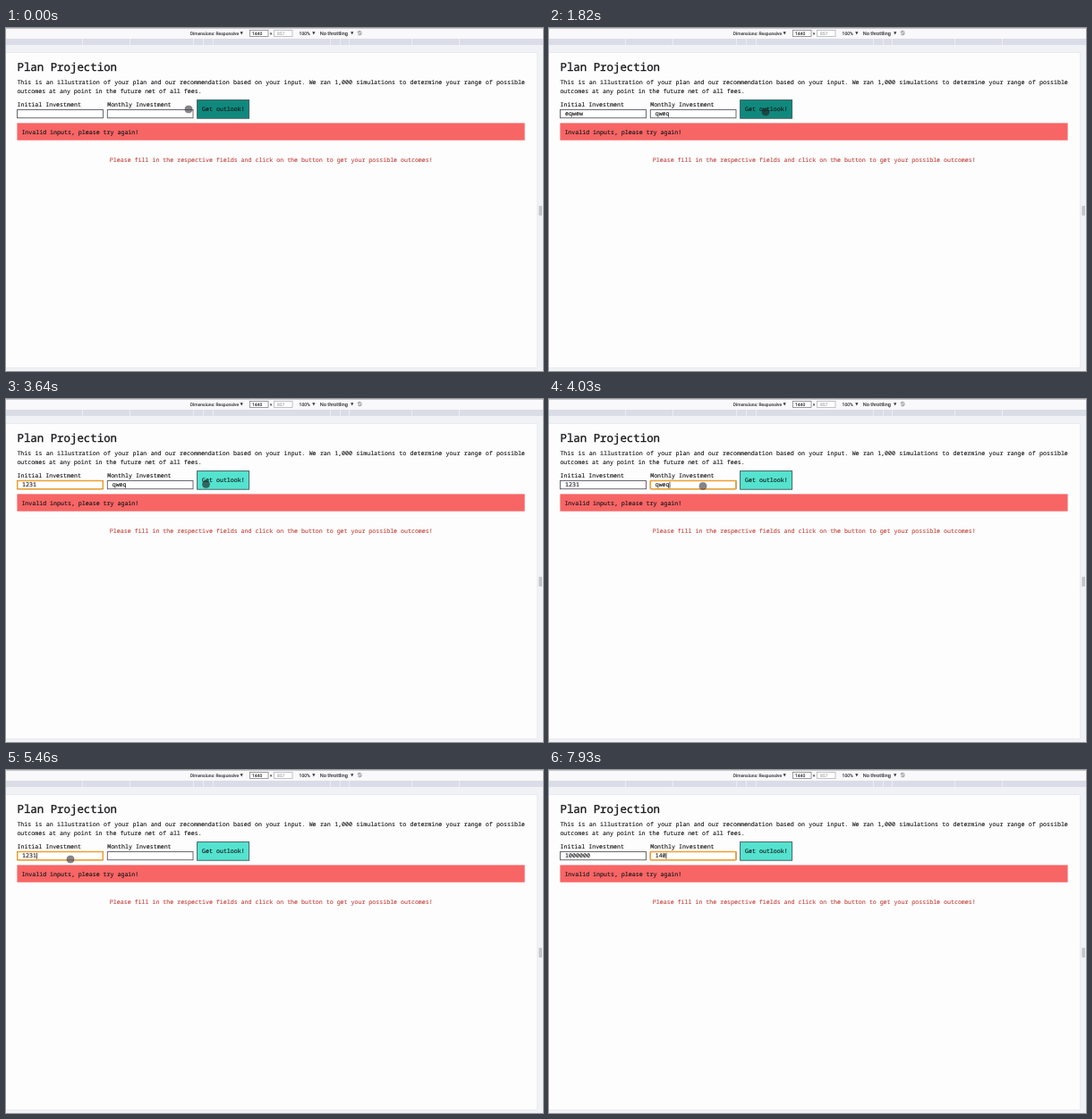
These frames come from a looping animation (600 px wide and 384 px high, 8000 ms). An HTML page:

```html
<!DOCTYPE html>
<html lang="en">
<head>
<meta charset="utf-8">
<title>Plan Projection</title>
<style>
html, body { margin: 0; width: 100%; height: 100%; overflow: hidden; background: #fdfdfe; }
svg { display: block; width: 600px; height: 384px; }
text { font: 6.61px "Noto Sans Mono", "DejaVu Sans Mono", monospace; fill: #161618; stroke: #161618; stroke-width: .12; white-space: pre; text-rendering: geometricPrecision; }
.title { font-size: 12.4px; stroke-width: .3; }
.hint { fill: #c4473f; stroke: #c4473f; }
.bar text { font: 5px Roboto, Inter, sans-serif; fill: #2a2a2c; stroke: #2a2a2c; }
.bar .dim { fill: #8a8a8e; stroke: none; }
.field { fill: #fff; stroke: #5a5966; stroke-width: .9; }
.ring { fill: none; stroke: #eda02f; stroke-width: 1.5; }
</style>
</head>
<body>
<svg viewBox="0 0 600 384">
  <rect width="600" height="384" fill="#f1f2f5"/>
  <g class="bar">
    <rect width="600" height="12" fill="#f9f8fa"/>
    <rect width="600" height=".8" fill="#b9b9bd"/>
    <rect y="12" width="600" height="7" fill="#dadde7"/>
    <path d="M85.5 12v7M138.5 12v7M209.5 12v7M220.5 12v7M231.5 12v7M362.5 12v7M373.5 12v7M383.5 12v7M453.5 12v7M506.5 12v7" stroke="#f0f1f6" stroke-width=".8"/>
    <text x="205.8" y="7.6">Dimensions: Responsive</text>
    <rect x="272.5" y="2.5" width="20.5" height="7" fill="#fff" stroke="#85868a" stroke-width=".8"/>
    <text x="275" y="7.8">1440</text>
    <text x="294.8" y="7.8">×</text>
    <rect x="299.5" y="2.5" width="20.5" height="7" fill="#fff" stroke="#b4b5ba" stroke-width=".8"/>
    <text class="dim" x="303" y="7.8">857</text>
    <text x="327.6" y="7.6">100%</text>
    <text x="350.8" y="7.6" style="font-size:5.6px">No throttling</text>
    <path fill="#333" d="M261.6 4.2h3.2l-1.6 3.2zM342.2 4.2h3.2l-1.6 3.2zM385.1 4.2h3.2l-1.6 3.2z"/>
    <g fill="none" stroke="#66666a" stroke-width=".6">
      <circle cx="395" cy="5.6" r="2.3" stroke-dasharray="5.2 2"/>
      <rect x="394.3" y="4.2" width="1.4" height="2.8" transform="rotate(-45 395 5.6)"/>
    </g>
  </g>
  <rect y="27.5" width="593.5" height="353" fill="#fdfdfe"/>
  <path d="M0 27.5H593.5V380.5H0" fill="none" stroke="#e6e7ec" stroke-width=".8"/>
  <rect x="595.4" y="199" width="3.6" height="11" rx="1" fill="#c4c5c9"/>

  <text class="title" x="12.5" y="48.4">Plan Projection</text>
  <text x="12.4" y="63.4" word-spacing=".36">This is an illustration of your plan and our recommendation based on your input. We ran 1,000 simulations to determine your range of possible</text>
  <text x="12.4" y="73.3">outcomes at any point in the future net of all fees.</text>
  <text x="12.5" y="88">Initial Investment</text>
  <text x="113.2" y="88">Monthly Investment</text>

  <rect class="field" x="12.5" y="91.5" width="96" height="9.2"/>
  <rect class="field" x="113.3" y="91.5" width="95.7" height="9.2"/>
  <rect class="ring" id="ring" y="91.4" width="95.6" height="9.4" rx="1.2"/>
  <text id="in0" x="18.1" y="98.4"></text>
  <text id="in1" x="118.7" y="98.4"></text>
  <rect id="caret" y="92.8" width=".8" height="6.8" fill="#222"/>

  <rect id="button" x="213.6" y="80.6" width="58" height="20.6" stroke="#3c565c" stroke-width=".9"/>
  <text x="219.1" y="93.4">Get outlook!</text>
  <rect x="12.4" y="106.4" width="567.2" height="19.3" fill="#f76565"/>
  <text x="17.4" y="118.5">Invalid inputs, please try again!</text>
  <text class="hint" x="296.3" y="149.7" text-anchor="middle">Please fill in the respective fields and click on the button to get your possible outcomes!</text>

  <circle id="touch" r="4.1" stroke="rgba(50,50,55,.4)" stroke-width=".7"/>
</svg>
<script>
const LOOP = 8000, STEP = 130, CHAR = 3.966;
const BUTTON = 2;
const $ = id => document.getElementById(id);
const show = (el, on) => el.style.display = on ? '' : 'none';

// The session, in steps of 130 ms: taps choose a target, typing goes to it.
const tap = (at, on, x, y) => ({ at, on, x, y });
const type = (at, text) => ({ at, text });
const clear = at => ({ at, text: '' });
const script = [
  tap(0, BUTTON, 204, 91),
  tap(3, 0, 72, 94), type(4, 'eqwew'),
  tap(10, 1, 137, 94), type(11, 'qweq'),
  tap(14, BUTTON, 242, 94),
  tap(18, 0, 66, 97), clear(20), type(23, '1231'),
  tap(29, BUTTON, 223.5, 95.5),
  tap(31, 1, 172, 97.5), clear(34),
  tap(39, BUTTON, 238, 94),
  tap(42, 0, 72, 100), clear(44), type(49, '1000000'),
  tap(57, 1, 156, 96), type(60, '140')
];
const isTap = a => 'on' in a;
const easeOut = p => 1 - (1 - p) ** 3;

// Replays the script up to step k; two keys fall in each step.
function replay(k) {
  const words = ['', ''];
  let last, edit = null;
  for (const a of script.filter(a => a.at <= k)) {
    if (isTap(a)) {
      last = a;
      edit = null;
    } else {
      edit = a;
      const keys = 2 * (k - a.at) + 1, old = words[last.on];
      words[last.on] = a.text ? a.text.slice(0, keys) : old.slice(0, Math.max(0, old.length - keys));
    }
  }
  return { words, last, edit, next: script.find(a => isTap(a) && a.at > k) };
}

// The pointer glides to each target and rests there one step before the tap.
function glide(k, last, next) {
  if (!next) return last;
  const from = Math.max(last.at, next.at - 4);
  const p = easeOut(Math.min(1, Math.max(0, (k - from) / (next.at - 1 - from))));
  return { x: last.x + (next.x - last.x) * p, y: last.y + (next.y - last.y) * p };
}

function draw(t) {
  const k = Math.floor(t / STEP);
  const { words, last, edit, next } = replay(k);
  words.forEach((word, i) => $('in' + i).textContent = word);

  const inField = last.on !== BUTTON;
  const idle = Math.max(0, k - (edit ? edit.at + 2 : last.at));
  show($('ring'), inField);
  show($('caret'), inField && Math.floor(idle / 3) % 2 === 0);
  if (inField) {
    $('ring').setAttribute('x', last.on ? 113.3 : 12.7);
    $('caret').setAttribute('x', (last.on ? 118.7 : 18.1) + words[last.on].length * CHAR);
  }
  $('button').setAttribute('fill', inField ? '#54e3cf' : '#0f897d');

  // Typing hides the pointer until it heads for the next tap.
  const dot = $('touch'), { x, y } = glide(k, last, next);
  show(dot, !edit || (next && k >= next.at - 2));
  dot.setAttribute('cx', x);
  dot.setAttribute('cy', y);
  dot.setAttribute('fill', x > 213 ? 'rgba(30,35,40,.66)' : 'rgba(70,70,75,.66)');
}

const start = performance.now();
function frame() {
  draw((performance.now() - start) % LOOP);
  requestAnimationFrame(frame);
}
frame();
</script>
</body>
</html>
```
